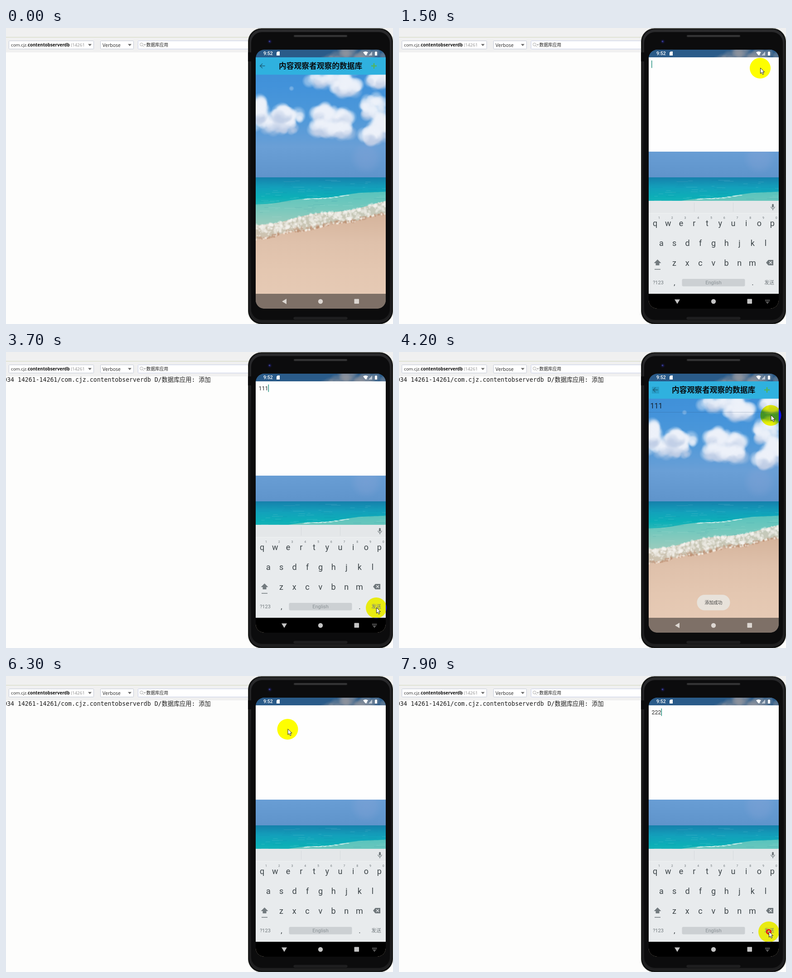
An HTML page with a canvas for the animation above (8 s loop, 854 px wide and 656 px high).

```html
<!DOCTYPE html>
<html lang="zh-CN">
<head>
<meta charset="utf-8">
<style>
  html, body { margin: 0; width: 100%; height: 100%; overflow: hidden; background: #fdfdfc; }
  canvas { display: block; width: 854px; height: 656px; }
</style>
</head>
<body>
<canvas id="stage" width="854" height="656"></canvas>
<script>
const LOOP = 8000, STEP = 100;
const SCREEN = { x: 551, y: 48, w: 287, h: 574 };
const CJK = '"Noto Sans CJK SC", "Noto Sans CJK", sans-serif';
const UI = '"Open Sans", ' + CJK;
const ROBOTO = 'Roboto, ' + CJK;
const MONO = '"DejaVu Sans Mono", "Noto Sans CJK SC", "Noto Sans CJK", monospace';
const stage = document.getElementById('stage');
let ctx = stage.getContext('2d');

// Drawing helpers
function rect(x, y, w, h, fill) { ctx.fillStyle = fill; ctx.fillRect(x, y, w, h); }
function box(x, y, w, h, r, fill, stroke, width = 1) {
  ctx.beginPath();
  ctx.roundRect(x, y, w, h, r);
  paint(fill, stroke, width);
}
function disc(x, y, r, fill, stroke, width) {
  ctx.beginPath();
  ctx.arc(x, y, r, 0, 7);
  paint(fill, stroke, width);
}
function shape(d, fill, stroke, width, x = 0, y = 0) {
  ctx.save();
  ctx.translate(x, y);
  const path = new Path2D(d);
  if (fill) { ctx.fillStyle = fill; ctx.fill(path); }
  if (stroke) { ctx.strokeStyle = stroke; ctx.lineWidth = width; ctx.stroke(path); }
  ctx.restore();
}
function paint(fill, stroke, width) {
  if (fill) { ctx.fillStyle = fill; ctx.fill(); }
  if (stroke) { ctx.strokeStyle = stroke; ctx.lineWidth = width; ctx.stroke(); }
}
function text(str, x, y, font, fill, align = 'left') {
  ctx.font = font;
  ctx.fillStyle = fill;
  ctx.textAlign = align;
  ctx.fillText(str, x, y);
}
function gradient(x0, y0, x1, y1, ...colors) {
  const g = ctx.createLinearGradient(x0, y0, x1, y1);
  colors.forEach((c, i) => g.addColorStop(i / (colors.length - 1), c));
  return g;
}
function layer(draw) {
  const canvas = document.createElement('canvas');
  canvas.width = 854;
  canvas.height = 656;
  const main = ctx;
  ctx = canvas.getContext('2d');
  draw();
  ctx = main;
  return canvas;
}
function clipScreen() {
  ctx.beginPath();
  ctx.roundRect(SCREEN.x, SCREEN.y, SCREEN.w, SCREEN.h, 19);
  ctx.clip();
}
function seeded(seed) {
  return () => (seed = (seed * 16807) % 2147483647) / 2147483647;
}
const ramp = (t, from, to) => Math.min(1, Math.max(0, (t - from) / (to - from)));

// Beach scenery
const random = seeded(77);
function puff(x, y, r, rgb, alpha) {
  const g = ctx.createRadialGradient(x, y, 0, x, y, r);
  g.addColorStop(0, `rgba(${rgb},${alpha})`);
  g.addColorStop(.55, `rgba(${rgb},${alpha * .75})`);
  g.addColorStop(1, `rgba(${rgb},0)`);
  ctx.fillStyle = g;
  ctx.fillRect(x - r, y - r, 2 * r, 2 * r);
}
function cloud(cx, cy, rx, ry) {
  for (let i = 0; i < 46; i++) {
    const a = random() * 6.28, d = Math.sqrt(random());
    const dy = Math.sin(a) * d;
    const rgb = dy > .35 ? '192,206,230' : '238,242,250';
    puff(cx + Math.cos(a) * d * rx, cy + dy * ry, 7 + random() * 11, rgb, .5);
  }
}
const shore = u => 468 - 55 * u + 2 * Math.sin(u * 19);
const surf = u => 437 - 50 * u + 3 * Math.sin(u * 11);
const shoal = u => 391 - 30 * u + 1.5 * Math.sin(u * 14);
function fillBelow(curve, fill) {
  ctx.beginPath();
  ctx.moveTo(551, 622);
  for (let u = 0; u <= 1.001; u += .02) ctx.lineTo(551 + 287 * u, curve(u));
  ctx.lineTo(838, 622);
  paint(fill);
}
const beach = layer(() => {
  clipScreen();
  rect(551, 48, 287, 284, gradient(0, 60, 0, 331, '#3c8ed6', '#4292da', '#4d98d9', '#6a9fd6', '#5f94cb'));
  [[585, 213, 36, 18], [626, 206, 28, 24], [561, 184, 8, 25], [610, 190, 18, 14],
   [700, 190, 18, 15], [735, 198, 27, 20], [700, 221, 22, 14], [738, 226, 25, 13],
   [812, 180, 24, 28], [825, 218, 20, 29], [806, 238, 18, 13],
   [715, 115, 48, 12], [752, 132, 30, 12], [822, 115, 22, 12], [770, 72, 70, 26]]
    .forEach(c => cloud(...c));
  puff(795, 288, 36, '140,165,215', .35);
  puff(630, 134, 6, '180,210,240', .5);
  rect(551, 331, 287, 170, gradient(0, 331, 0, 465, '#1580ab', '#13a0bb', '#0cafb7', '#33bcb8', '#75c5b8', '#a9cbb9', '#c2c9b8'));
  fillBelow(shoal, gradient(0, 360, 0, 465, '#57c3bd', '#72c8bd', '#95cbbd', '#b4c9b9'));
  for (let i = 0; i < 110; i++) {
    const u = random();
    const y = 336 + random() * 90;
    rect(551 + 287 * u, y, 5 + random() * 22, 1, random() < .5 ? 'rgba(255,255,255,.12)' : 'rgba(0,100,140,.12)');
  }
  for (let i = 0; i < 60; i++) {
    const u = .35 + random() * .35;
    rect(551 + 287 * u, shoal(u) + random() * 2 - 1, 6, 1, 'rgba(235,250,248,.5)');
  }
  fillBelow(surf, gradient(0, 385, 0, 470, '#c3cbbd', '#c9c7b6', '#cfc1ae'));
  fillBelow(shore, gradient(0, 413, 0, 600, '#d5b49c', '#dfc1ab', '#e4c7b1', '#e6cab5'));
  for (let i = 0; i < 420; i++) {
    const u = random(), v = random() ** 1.4;
    const y = surf(u) + (shore(u) - surf(u)) * v;
    puff(551 + 287 * u, y, 1.5 + random() * 4, v > .8 ? '190,148,120' : '246,244,240', .55);
  }
  for (let i = 0; i < 130; i++) {
    const u = random();
    puff(551 + 287 * u, shore(u) - 2 + random() * 3, 3, random() < .5 ? '250,245,238' : '186,140,110', .6);
  }
});

// Log window and phone body
function drawDesktop() {
  rect(0, 0, 854, 656, '#fdfdfc');
  rect(0, 0, 854, 54, '#f0f0f0');
  rect(0, 20, 854, 1, '#d3d8bd');
  box(6.5, 28.5, 187, 18, 1, '#fff', '#c3c9d6');
  box(208.5, 28.5, 73, 18, 1, '#fff', '#c3c9d6');
  box(291.5, 28.5, 270, 18, 1, '#fff', '#c6cde6');
  text('com.cjz.', 11, 41, '9.8px ' + UI, '#222');
  text('contentobserverdb', 48, 41, 'bold 9.7px ' + UI, '#111');
  text('(14261', 143, 41, '9.8px ' + UI, '#8c8c8c');
  text('Verbose', 213, 41.5, '10.5px ' + UI, '#222');
  for (const x of [185, 273]) shape('M-4-2H4L0 2.5Z', '#666', null, 0, x, 37.5);
  disc(299, 36.5, 3.4, null, '#aaa', 1);
  shape('M2.5 2.5L6 6M5.5 0H9L7.2 2Z', '#999', '#aaa', 1, 299, 36.5);
  text('数据库应用', 309.5, 41, '9.7px ' + CJK, '#222');
}
function drawPhone() {
  box(534.5, 1, 319, 655, 29, '#0b0b0c', '#4a4d45', 1);
  box(537.5, 3.5, 313, 649, 27, gradient(0, 3, 0, 652, '#2a2a2c', '#121213', '#0c0c0d', '#101011', '#1e1e1f'), '#252527', 1.5);
  box(541, 9, 306, 638, 24, '#0c0c0d');
  box(635, 15.5, 118, 4.5, 2, '#363637', '#1a1a1b');
  box(635, 641, 118, 4.5, 2, '#1d1d1e', '#252526');
  disc(582, 30, 5, '#101020');
  disc(582, 30, 2.4, '#22226a');
  disc(581, 29.5, 1, '#5560b0');
}
const backdrop = layer(() => { drawDesktop(); drawPhone(); });

// Phone pages
function drawStatusBar() {
  rect(551, 48, 287, 17, 'rgba(20,25,35,.43)');
  text('9:52', 568, 60, '500 10.5px ' + ROBOTO, '#fff');
  shape('M2.5 0H7V9H0V2.5Z', '#fff', null, 0, 597, 52);
  shape('M0 2Q5.5-2 11 2L5.5 9Z', '#fff', null, 0, 788, 52);
  text('x', 794, 61, '7px ' + ROBOTO, '#fff');
  shape('M8 0V9H0Z', 'rgba(255,255,255,.6)', null, 0, 800, 52);
  shape('M1.5 0H3.5V1H5V9H0V1H1.5Z', '#fff', null, 0, 814, 52);
}
function drawHome(hasItem, focused) {
  ctx.drawImage(beach, 0, 0);
  rect(551, 65, 287, 38.5, '#2fb1df');
  if (focused) rect(558, 77, 16, 15, 'rgba(0,50,80,.16)');
  shape('M5.5-5L0 0L5.5 5M0 0H11', null, '#1b607b', 1.4, 560.5, 84);
  text('内容观察者观察的数据库', 602, 90, 'bold 16.75px ' + CJK, '#080c10');
  shape('M-6 0H6M0-6V6', null, '#52b45b', 2.6, 812, 84);
  if (hasItem) {
    text('111', 554.5, 125, '16px ' + ROBOTO, '#14202c');
    rect(551, 133, 287, 1, 'rgba(40,70,110,.25)');
  }
}
function drawEditor(value, caretOn) {
  ctx.drawImage(beach, 0, 0);
  rect(551, 65, 287, 209, '#fefefe');
  text(value, 557.5, 84.5, '12.5px ' + ROBOTO, '#2a2a2a');
  if (caretOn) rect(557 + (value ? value.length * 7.02 + .5 : 0), 72, 1.5, 16.5, '#279382');
}
function keyRow(letters, x, y) {
  [...letters].forEach((c, i) => text(c, x + i * 28.75, y, '18px ' + ROBOTO, '#3d4549', 'center'));
}
function drawKeyboard(shown) {
  if (shown <= 0) return;
  ctx.save();
  ctx.beginPath();
  ctx.rect(551, 383, 287, 206);
  ctx.clip();
  ctx.translate(0, 206 * (1 - shown));
  rect(551, 383, 287, 206, '#e8ebed');
  rect(551, 383, 287, 28, '#e4e7e9');
  rect(551, 410, 287, 1, '#f0f2f3');
  rect(651, 387, 1, 20, '#d5d9dc');
  rect(737, 387, 1, 20, '#d5d9dc');
  box(823, 390, 4, 8, 2, '#6f777b');
  shape('M-4-2A4 4.5 0 0 0 4-2M0 3V6', null, '#6f777b', 1.3, 825, 398);
  keyRow('qwertyuiop', 565, 439);
  [...'1234567890'].forEach((c, i) => text(c, 574 + i * 28.75, 422.5, '7px ' + ROBOTO, '#70787c', 'center'));
  keyRow('asdfghjkl', 579, 483);
  keyRow('zxcvbnm', 607.5, 527);
  shape('M0-7L8 1H4V6H-4V1H-8Z', '#737b7f', null, 0, 570.5, 520);
  rect(564, 534, 13, 1.5, '#737b7f');
  shape('M-8 0L-3-6H8V6H-3Z', '#6f777b', null, 0, 818, 520);
  shape('M-1-3L5 3M5-3L-1 3', null, '#e8ebed', 1.4, 818, 520);
  text('?123', 572, 567.5, '11px ' + ROBOTO, '#70787c', 'center');
  text(',', 608, 570, '17px ' + ROBOTO, '#3d4549', 'center');
  box(624.5, 556, 139, 16.5, 3, '#ccd0d3');
  text('English', 694, 567.5, '11px ' + ROBOTO, '#8b9296', 'center');
  text('.', 780.5, 570, '17px ' + ROBOTO, '#3d4549', 'center');
  text('发送', 817, 568, '10.8px ' + CJK, '#70787c', 'center');
  ctx.restore();
}
function drawNavBar(dark, typing) {
  rect(551, 589, 287, 33, dark ? '#000' : 'rgba(24,24,26,.5)');
  const color = dark ? '#c4c4c4' : '#dcd6d1';
  shape(typing ? 'M-6-4.5H6L0 5.5Z' : 'M5-6V6L-5 0Z', color, null, 0, 614, 606);
  disc(694, 606, 5.2, color);
  box(768.5, 600.5, 10.5, 10.5, 1, color);
  if (!typing) return;
  const faint = dark ? '#8a8a8a' : '#b5aca5';
  for (let row = 0; row < 2; row++)
    for (let i = 0; i < 5; i++) rect(808 + i * 2.2, 602 + row * 2.3, 1.4, 1.4, faint);
  rect(810, 607, 6, 1.3, faint);
  shape('M-2 0H2L0 2Z', faint, null, 0, 813, 609);
}
function drawToast(alpha) {
  ctx.globalAlpha = alpha;
  box(657.5, 538, 73, 34.5, 17, '#e9e4de');
  text('添加成功', 694, 558.5, '9.8px ' + CJK, '#333', 'center');
  ctx.globalAlpha = 1;
}

// Pointer
const route = [
  [100, 818, 91], [200, 797, 89], [2300, 797, 89], [2600, 793.5, 304], [2900, 806, 498],
  [3100, 817, 567], [3800, 817, 567], [4200, 820.5, 140.5], [4500, 831, 110], [4800, 812, 90],
  [4900, 796, 88], [5800, 796, 88], [6100, 660, 112], [6300, 621.5, 118], [6800, 621.5, 118],
  [7100, 700, 350], [7400, 806, 613], [7700, 816, 567], [8000, 816, 567]
];
const clicks = [[500, 700], [3200, 3400], [4900, 5100], [7900, 8000]];
function drawPointer(t) {
  if (t < route[0][0]) return;
  const i = route.findIndex(p => p[0] > t);
  const [t0, x0, y0] = route[i - 1], [t1, x1, y1] = route[i];
  const k = ramp(t, t0, t1);
  const x = x0 + (x1 - x0) * k, y = y0 + (y1 - y0) * k;
  // Inverting the blue channel gives yellow on white and blue on black
  ctx.globalCompositeOperation = 'difference';
  disc(x, y, 23, '#00f');
  ctx.globalCompositeOperation = 'source-over';
  if (clicks.some(([from, to]) => t >= from && t < to)) disc(x, y, 4.5, null, '#f01010', 3);
  shape('M0 0V12.5L2.9 9.8L5 14.5L7.2 13.5L5.1 9H9Z', '#fff', '#222', 1, x + .5, y - .5);
}

const visits = [
  { open: 700, keyboard: 1200, close: 3900, value: '111', keys: [2100, 2200, 2400] },
  { open: 5000, keyboard: 5600, close: 9000, value: '222', keys: [6700, 7000, 7500] }
];
function draw(t) {
  ctx.drawImage(backdrop, 0, 0);
  if (t >= 3700) text('034 14261-14261/com.cjz.contentobserverdb D/数据库应用: 添加', -5.8, 65.5, '13.2px ' + MONO, '#1c1c1c');
  rect(534, 54, 17, 20, '#0b0b0c');

  ctx.save();
  clipScreen();
  drawHome(t >= 3900, t >= 3900 && t < 4900);
  const visit = visits[t < 4600 ? 0 : 1];
  const opened = Math.min(ramp(t, visit.open, visit.open + 300), 1 - ramp(t, visit.close - 100, visit.close + 100));
  if (opened > 0) {
    const value = visit.value.slice(0, visit.keys.filter(k => t >= k).length);
    const caretOn = t < visit.keys[0] - 400 || t >= visit.keys[0];
    ctx.save();
    ctx.globalAlpha = opened;
    ctx.translate(0, 40 * (1 - opened) ** 2);
    drawEditor(value, caretOn);
    ctx.restore();
  }
  const keyboard = Math.min(ramp(t, visit.keyboard, visit.keyboard + 200), 1 - ramp(t, 3700, 3900) * (t < 4600));
  drawKeyboard(keyboard);
  drawStatusBar();
  const typing = t >= visit.keyboard - (t < 4600 ? 100 : 0) && !(t >= 3800 && t < 4600);
  drawNavBar(keyboard > 0, typing);
  const toast = Math.min(ramp(t, 3700, 4100), 1 - ramp(t, 5500, 5800));
  if (toast > 0) drawToast(toast * (t < 4300 ? .92 : 1));
  ctx.restore();
  drawPointer(t);
}

function frame() {
  const t = performance.now() % LOOP;
  draw(Math.floor(t / STEP) * STEP);
  requestAnimationFrame(frame);
}
frame();
</script>
</body>
</html>
```
